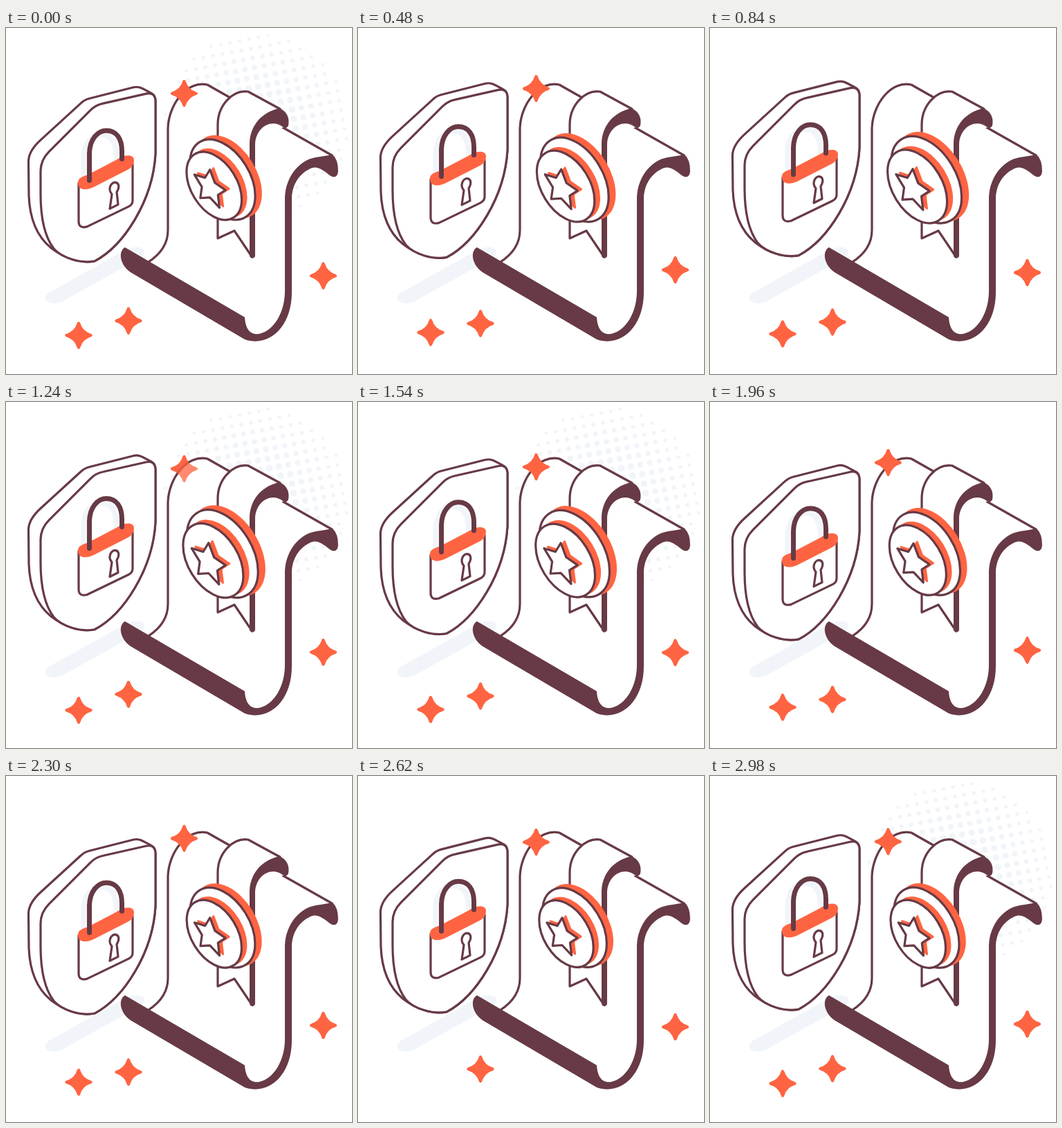
An HTML page for the animation above (3 s loop, 500 px wide and 500 px high).

```html
<!DOCTYPE html>
<html>
<head>
<meta charset="utf-8">
<style>
html,body{margin:0;width:100%;height:100%;overflow:hidden;background:#fff}
svg{display:block;width:100vw;height:100vh}
.o{fill:#fff;stroke:#673a45;stroke-width:3.2;stroke-linejoin:round;stroke-linecap:round}
.w{fill:#fff}
.l{fill:none}
.d{fill:#673a45}
.r{fill:#ff6442}
.p{fill:#f1f5f9}
#spark{stroke:#ff6442;stroke-width:4;stroke-linejoin:round}
#disc,#badge{vector-effect:non-scaling-stroke}
</style>
</head>
<body>
<svg viewBox="0 0 500 500">
  <defs>
    <path id="spark" class="r" d="M0-17.500Q4-4 17.500 0Q4 4 0 17.500Q-4 4-17.500 0Q-4-4 0-17.500Z"/>
    <circle id="disc" r="1" transform="matrix(40 20 0 45 0 0)"/>
    <polygon id="badge" transform="matrix(40 20 0 45 295 231)"/>
    <path id="shackle" d="M120.500 220V181C121 160 133 148 145 148C160 148 167.500 160 167.500 178V189"/>
  </defs>
  <g id="dots" class="p"></g>
  <path class="p" d="M61 383L172 321C185 315 201 315 200 324Q200 329 195 332L78 397C62 401 50 393 61 383Z"/>

  <g id="shield">
    <path class="o" d="M32.500 192C33 181 39 172 50 162L108 109Q113 104 121 102L184 86C192 84 196 87 211 95Q216 98 216 106V182C212 250 170 315 128 337C108 341 83 332 65 318C43 300 34 272 33 242Z"/>
    <path class="o" d="M50 207C50 195 54 187 62 179L122 119Q130 111 141 109L203 95Q215 93 216 105V182C212 250 170 315 128 337C108 341 80 332 69 319C53 298 50 267 50 240Z"/>
  </g>
  <g id="lock">
    <use href="#shackle" transform="translate(-8 6)" fill="none" stroke="#f1f5f9" stroke-width="8"/>
    <path class="o" d="M105 224V279Q105 290 117 287L177 258Q183 255 183 249V196Z"/>
    <path class="r" d="M104 223C104 216 112 214 118 212L160 190C172 182 185 182 185 191Q185 199 177 204L126 230C114 235 104 234 104 223Z"/>
    <use href="#shackle" fill="none" stroke="#673a45" stroke-width="7" stroke-linecap="round"/>
    <path class="o" d="M153 240C147 233 151 225 156 223C163 222 165 229 160 237L162 255L150 261Z"/>
  </g>

  <g id="back"></g>
  <path class="w" d="M206 338C226 325 234 310 234 292V145C235 110 262 75 291 82L470 184L404 240V390L366 442L345 418Z"/>
  <path class="o l" d="M206 338C226 325 234 310 234 292V145C235 110 262 75 291 82L471 184"/>
  <path class="d" d="M172 317L345 418C346 434 352 444 366 442C388 437 403 410 403 380V245C404 215 424 188 454 186L472 183Q480 190 480 207C479 216 474 217 468 213C456 203 448 199 440 203C425 210 413 225 413 248V382C413 432 380 462 345 450L180 353C164 342 162 322 172 317Z"/>

  <path class="w" d="M306 160V140C306 112 327 89 350 92L396 117Q409 124 408 140L356 165V330L330 293L306 304Z"/>
  <path class="o l" d="M306 160V140C306 112 327 89 350 92L396 117M306 270V304L330 293L355 330"/>
  <path class="d" d="M352 330V166C353 142 368 122 395 116C407 121 410 131 408 141Q406 146 400 143C384 130 361 143 360 168V330Q356 336 352 330Z"/>

  <g id="medal">
    <use class="r" href="#disc" transform="translate(321 215) scale(1.2)"/>
    <use class="o" href="#disc" transform="translate(313 219) scale(1.16)"/>
    <use class="r" href="#disc" transform="translate(308 224)"/>
    <use class="o" href="#disc" transform="translate(301 228) scale(.98)"/>
    <use class="r" href="#badge" transform="translate(5 -2)" stroke="#ff6442" stroke-width="3" stroke-linejoin="round"/>
    <use class="o" href="#badge"/>
  </g>
  <g id="front"></g>
</svg>
<script>
const LOOP = 3000, W = 2 * Math.PI / LOOP;
const $ = id => document.getElementById(id);
const move = (el, x, y, rest = '') => el.setAttribute('transform', `translate(${x} ${y}) ${rest}`);

// Eased swing between value a at time ta and value b at time tb
function swing(t, ta, a, tb, b) {
  const since = (t - ta + LOOP) % LOOP, way = tb - ta;
  const u = since < way ? since / way : (LOOP - since) / (LOOP - way);
  return a + (b - a) * (1 - Math.cos(Math.PI * u)) / 2;
}
const bob = t => swing(t, 1100, -9, 2080, 6.5);

// Each spark floats on two waves and may fade out around one moment
const sparks = [
  {x: 257.5, y: 92, slow: 0, fast: -4.5, gone: 1000},
  {x: 458.5, y: 358, slow: -4.6, fast: -3.9},
  {x: 177, y: 425.5, slow: -1.5, fast: 3},
  {x: 105, y: 443, slow: -.5, fast: -2.5, gone: 2560}
];
const uses = '<use href="#spark"/>'.repeat(sparks.length);
$('back').innerHTML = $('front').innerHTML = uses;

$('badge').setAttribute('points', Array.from({length: 10}, (_, i) => {
  const r = i % 2 ? .3 : .58, a = i * Math.PI / 5;
  return [r * Math.sin(a), -r * Math.cos(a)];
}).join(' '));

let dots = '';
for (let i = -10; i <= 10; i++) for (let j = -10; j <= 10; j++) {
  const x = 13.7 * i + 2.6 * j, y = 13.7 * j - 2.6 * i, d = Math.hypot(x, y);
  if (d < 135) dots += `<circle cx="${361 + x}" cy="${142 + y}" r="${6.5 - d / 32}"/>`;
}
$('dots').innerHTML = dots;

function draw(t) {
  move($('shield'), 0, bob(t));
  move($('lock'), 0, bob(t - 30));
  move($('medal'), 315.5, 217, `scale(${swing(t, 1200, 1.11, 2600, 1)}) translate(-315.5 -217)`);
  $('dots').style.display = Math.cos(2 * W * t) > .3 ? '' : 'none';
  sparks.forEach((s, i) => {
    const a = W * (t - 520);
    const y = s.y + s.slow * Math.cos(a) + s.fast * Math.cos(2 * a);
    const alpha = s.gone ? Math.min(1, Math.abs(t - s.gone) / 320) : 1;
    // The fade is smooth only over the paper; elsewhere it switches hard
    for (const id of ['back', 'front']) {
      const el = $(id).children[i];
      move(el, s.x, y);
      el.style.display = alpha < .5 ? 'none' : '';
    }
    $('front').children[i].style.opacity = alpha;
  });
}

const start = performance.now();
function tick() {
  draw((performance.now() - start) % LOOP);
  requestAnimationFrame(tick);
}
tick();
</script>
</body>
</html>
```
